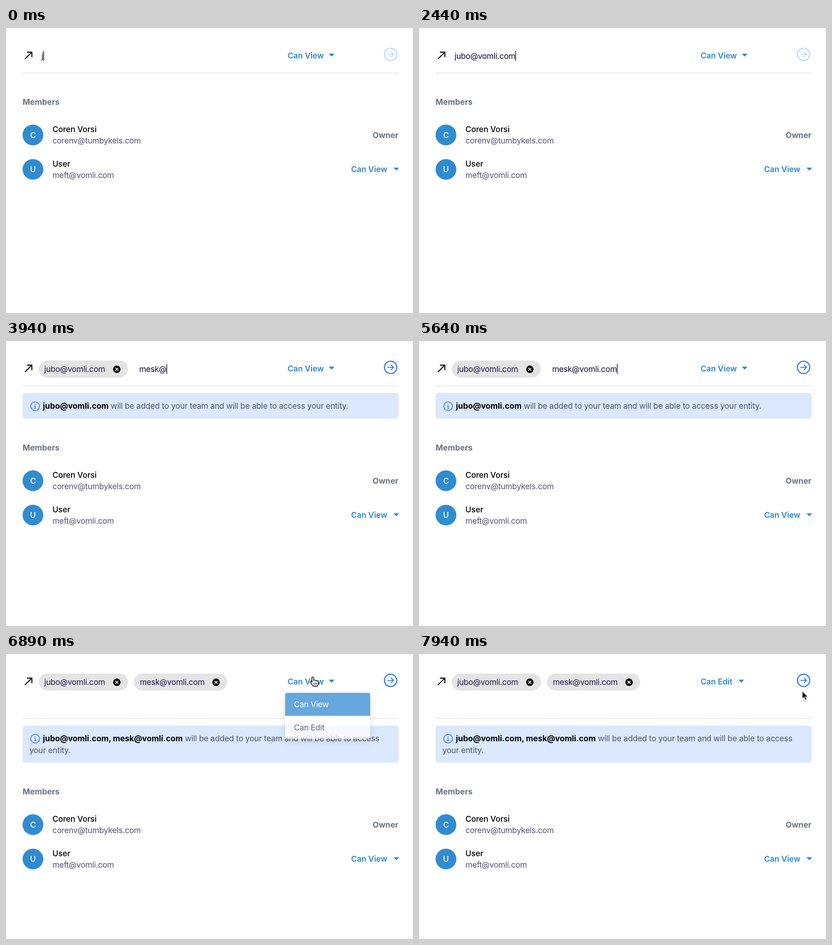
These frames come from a looping animation (894x627 px, 7.99 s). An HTML page:

```html
<!DOCTYPE html>
<html lang="en">
<head>
<meta charset="utf-8">
<title>Share with members</title>
<style>
  html, body { margin: 0; width: 100%; height: 100%; overflow: hidden; background: #fff; }
  svg { display: block; width: 100vw; height: 100vh; }
  text { font: 400 17.5px Inter, "Liberation Sans", sans-serif; letter-spacing: -.015em; white-space: pre; }
  .bold { font-weight: 700; letter-spacing: 0; fill: #000; }
  .gray { font-weight: 700; letter-spacing: 0; fill: #6b7280; }
  .name { font-weight: 500; letter-spacing: -.005em; fill: #000; }
  .mail { fill: #575073; }
  .select { font-weight: 600; letter-spacing: -.003em; fill: #2f86c8; }
  .typed { fill: #0d0930; }
  .chip { fill: #1f1848; }
  .note { letter-spacing: -.0105em; fill: #4b5563; }
  .initial { font-weight: 500; fill: #fff; text-anchor: middle; }
  .line { fill: none; stroke-linecap: round; stroke-linejoin: round; }
</style>
</head>
<body>
<svg id="stage" viewBox="0 0 894 627"></svg>
<script>
const LOOP = 7990;
const FIRST = "jubo@vomli.com", SECOND = "mesk@vomli.com";
const FIRST_KEYS = [0, 190, 390, 540, 690, 1090, 1440, 1590, 1740, 1890, 1940, 2090, 2190, 2240];
const SECOND_KEYS = [3140, 3390, 3540, 3640, 3940, 4240, 4540, 4640, 4790, 5040, 5190, 5340, 5490, 5640];
const CHIP_1 = 2540, CHIP_2 = 5840;
const MENU_OPEN = 6780, MENU_PICK = 7460;
// Pointer stops: time, x, y
const PATH = [[6190, 440, 94], [6440, 537.5, 77], [6740, 664, 58], [6890, 674, 50],
              [7140, 674, 50], [7340, 690, 158], [7480, 690, 158], [7890, 836, 86], [7940, 842, 81.5]];

const text = (x, y, cls, str, id = "") => `<text id="${id}" class="${cls}" x="${x}" y="${y}">${str}</text>`;
const arrowDown = (x, y) => `<path d="M${x} ${y}h12.6l-6.3 6.4z" fill="#2f86c8"/>`;

const chip = (id, x, w, str, tx) => `<g id="${id}">
  <rect x="${x}" y="43" width="${w}" height="37.5" rx="18.75" fill="#e4e4e4"/>
  ${text(tx, 68, "chip", str)}
  <circle cx="${x + w - 24.6}" cy="62.2" r="8.2"/>
  <path class="line" d="M${x + w - 27.2} 59.6l5.2 5.2m0 -5.2l-5.2 5.2" stroke="#fff" stroke-width="1.8"/></g>`;

const banner = (id, y, h, body) => `<g id="${id}">
  <rect x="36.5" y="${y}" width="826" height="${h}" rx="6" fill="#dbe8fd"/>
  <g class="line" transform="translate(64 ${y + 29})" stroke="#3b82f6" stroke-width="1.8">
    <circle r="9.6"/><path d="M-1.4 -.6H.2V4.2M-1.6 4.3H2" stroke-width="1.6"/><circle cx="-.1" cy="-4" r=".4"/></g>
  ${body}</g>`;

const member = (y, letter, name, mail) => `
  <circle cx="59.2" cy="${y}" r="22.8" fill="#318bd0"/>
  ${text(59.2, y + 6.4, "initial", letter)}
  ${text(102, y - 6, "name", name)}
  ${text(102, y + 19, "mail", mail)}`;

document.getElementById("stage").innerHTML = `
  <rect width="894" height="627" fill="#fff"/>
  <path d="M41.5 68.3L56.6 53.2M46 53.2H56.8V64.2" fill="none" stroke="#000" stroke-width="2.2"/>
  ${chip("chip1", 72, 196, FIRST, 84)}
  ${chip("chip2", 281, 205, SECOND, 294)}
  ${text(78, 68, "typed", "", "input")}
  <rect id="caret" width="1.4" height="22" fill="#0d0930"/>
  ${text(618.5, 67, "select", "", "role")}
  <g id="roleArrow">${arrowDown(709, 56.6)}</g>
  <g id="send" class="line" stroke-width="2.6"><circle cx="844.8" cy="58" r="13.5"/>
    <path d="M838.6 58H851M845.8 52.6L851.2 58L845.8 63.4" stroke-width="2.1"/></g>
  <rect id="rule" x="36.5" width="826" height="1.4" fill="#e4e5e7"/>
  ${banner("note1", 114.5, 56.5, text(81, 148.8, "bold", FIRST) +
    text(230, 148.8, "note", "will be added to your team and will be able to access your entity."))}
  ${banner("note2", 157.4, 81.6, text(81, 191.6, "bold", FIRST + ", " + SECOND) +
    text(393, 191.6, "note", "will be added to your team and will be able to access") +
    text(51.5, 218, "note", "your entity."))}
  <g id="members">
    ${text(36.5, 168.8, "gray", "Members")}
    ${member(235.4, "C", "Coren Vorsi", "corenv@tumbykels.com")}
    ${member(311, "U", "User", "meft@vomli.com")}
    <g text-anchor="end">${text(862, 242, "gray", "Owner")}</g>
    ${text(758, 317.4, "select", "Can View")}
    ${arrowDown(851, 307.2)}
  </g>
  <g id="menu">
    <rect x="613" y="85.5" width="187" height="101" rx="4" fill="#fff" style="filter:drop-shadow(0 5px 8px rgba(0,0,0,.16))"/>
    <path d="M613 136V89.5q0 -4 4 -4H796q4 0 4 4V136z" fill="#318bd0"/>
    <text x="632.5" y="117.4" fill="#fff">Can View</text>
    <text x="632.5" y="167.6" fill="#3d3b55">Can Edit</text>
  </g>
  <g id="pointer" style="filter:drop-shadow(0 1px 1px rgba(0,0,0,.35))">
    <path id="arrow" d="M0 0V17L3.9 13.5L6.6 19.8L9.4 18.6L6.7 12.5H12z" fill="#000" stroke="#fff" stroke-width="1.1"/>
    <g id="hand" class="line" stroke="#000" stroke-width="1.3">
      <path d="M-1.8 12V2.2Q-1.8 .5 0 .5T1.8 2.2V8Q4.6 6.3 5.4 8.6Q8 7.3 8.9 9.6Q12 8.9 12 11.8V14.5Q12 17 10.2 20.5H.6Q-1 17.8 -3 15.4T-5.6 11.6Q-5.6 9.4 -3.4 10.3z" fill="#fff"/>
      <path d="M2.7 13.5V17.2M5.5 13.5V17.2M8.2 13.5V17.2" stroke-width="1"/>
    </g>
  </g>`;

const el = {};
document.querySelectorAll("[id]").forEach(node => el[node.id] = node);
const show = (node, on) => node.setAttribute("visibility", on ? "visible" : "hidden");
const move = (node, x, y) => node.setAttribute("transform", `translate(${x} ${y})`);
const clamp = v => Math.min(1, Math.max(0, v));
const typed = (str, keys, t) => str.slice(0, keys.filter(k => k <= t).length);

function pointerAt(t) {
  const i = PATH.findIndex(p => p[0] > t);
  if (i < 0) return PATH[PATH.length - 1].slice(1);
  const [t0, x0, y0] = PATH[Math.max(0, i - 1)], [t1, x1, y1] = PATH[i];
  const k = clamp((t - t0) / (t1 - t0 || 1)), e = k * k * (3 - 2 * k);
  return [x0 + (x1 - x0) * e, y0 + (y1 - y0) * e];
}

function drawInput(t, step) {
  const str = [typed(FIRST, FIRST_KEYS, t), typed(SECOND, SECOND_KEYS, t), ""][step];
  const x = [78, 292.5, 78.3][step];
  el.input.textContent = str;
  el.input.setAttribute("x", x);
  el.caret.setAttribute("x", x + (str ? el.input.getComputedTextLength() : 0));
  el.caret.setAttribute("y", step === 2 ? 102 : 50.4);
  const off = (t >= 2890 && t < 3140) || (t >= 5990 && t < 6490) || t >= MENU_OPEN;
  show(el.caret, !off);
}

function drawPointer(t, menuOn) {
  const [x, y] = pointerAt(t);
  const onSelect = x > 612 && x < 728 && y > 40 && y < 76;
  const onMenu = menuOn && x > 613 && x < 800 && y > 85 && y < 187;
  const hand = onSelect || onMenu;
  show(el.arrow, t >= PATH[0][0] && !hand);
  show(el.hand, t >= PATH[0][0] && hand);
  move(el.pointer, x, y);
}

function draw(t) {
  const step = t < CHIP_1 ? 0 : t < CHIP_2 ? 1 : 2;
  show(el.chip1, step > 0);
  show(el.chip2, step > 1);
  show(el.note1, step === 1);
  show(el.note2, step === 2);
  el.send.setAttribute("stroke", step ? "#3b7ff2" : "#bfdbfe");
  el.rule.setAttribute("y", step === 2 ? 141 : 98.2);
  move(el.members, 0, [0, 72, 140][step]);
  drawInput(t, step);

  const edit = t >= MENU_PICK;
  el.role.textContent = edit ? "Can Edit" : "Can View";
  move(el.roleArrow, edit ? -7.6 : 0, 0);
  const alpha = edit ? 1 - clamp((t - MENU_PICK) / 120) : clamp((t - MENU_OPEN) / 150);
  el.menu.setAttribute("opacity", alpha);
  show(el.menu, alpha > 0);
  drawPointer(t, alpha > 0);
}

const start = performance.now();
function frame() {
  draw((performance.now() - start) % LOOP);
  requestAnimationFrame(frame);
}
frame();
</script>
</body>
</html>
```
